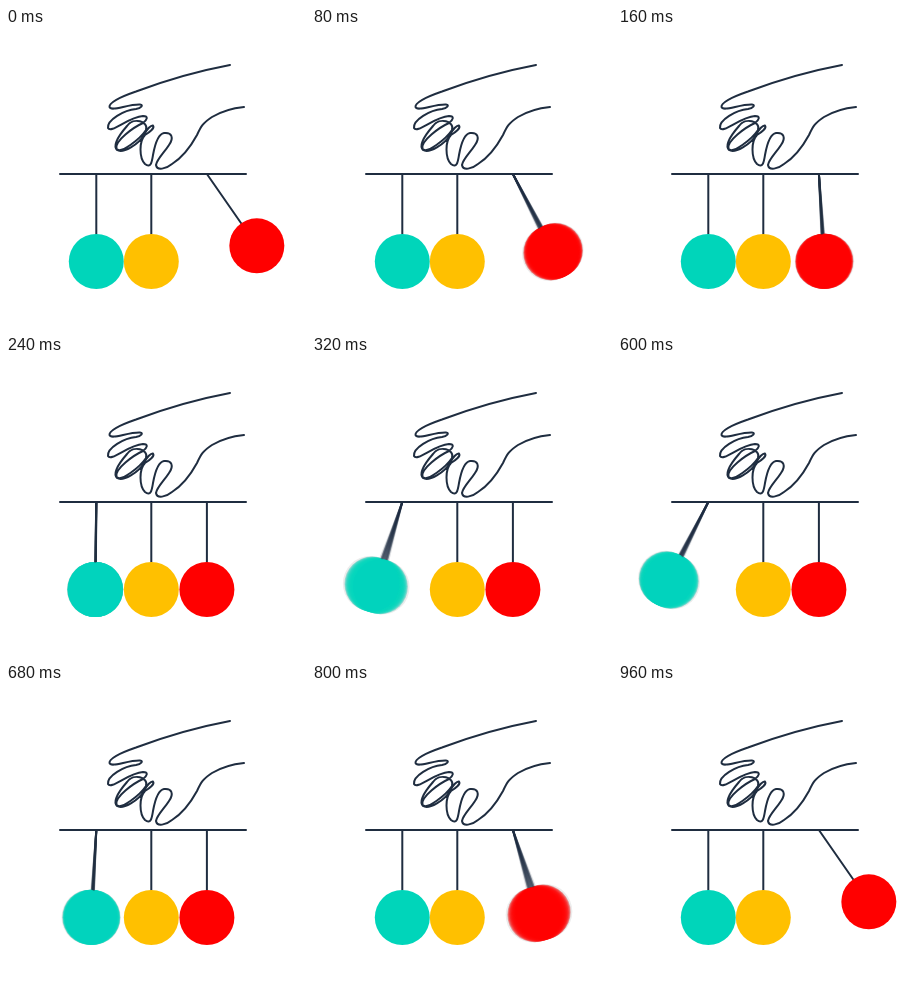
Recreate the animation shown at these times as an HTML page with a canvas. Size 300 by 300 pixels, loop 1000 ms.

```html
<!DOCTYPE html>
<html lang="en">
<head>
<meta charset="utf-8">
<title>Hand and swinging balls</title>
<style>
  html, body { margin: 0; width: 100%; height: 100%; overflow: hidden; background: #fff; }
  canvas { display: block; width: 100vw; height: 100vh; }
</style>
</head>
<body>
<canvas id="stage" width="300" height="300"></canvas>
<script>
const ctx = document.getElementById('stage').getContext('2d');
const INK = '#1f2d40';
const LOOP = 1000, STEP = 40;
const BAR_Y = 146, LENGTH = 87.5, RADIUS = 27.5;
const SWING = 34.8 * Math.PI / 180;

const hand = new Path2D(`M224 37 C192 43 158 53 130 63.5 C117 68 103 74 103.5 79
  C105 84 122 76 134 76.5 C138 77 135 80 130 81
  C118 82 101 92 102 100 C105 106 122 89 137 88
  C143 88 141 92 137 95 C128 99 108 113 110.5 121
  C115 126 134 111 140 102 C143 93 127 89 121 98
  C108 113 108 119 111 122 C117 126 133 116 138 107
  C141 101 145 97 147 97.5 C149 100 144 104 139 107
  C133 113 133 130 139 136 C145 141 146 133 147 127
  C149 116 152 106 158 105 C166 104 168 110 163 117
  C158 125 151 131 150 137 C151 143 160 141 166 136
  C177 129 185 118 191 107 C195 98 197 95 206 89
  C216 83 228 80 238 79`);

function ease(t, start, duration) {
  const x = Math.min(1, Math.max(0, (t - start) / duration));
  return x < 0.5 ? 4 * x ** 3 : 1 - 4 * (1 - x) ** 3;
}

const leftSwing = t => ease(t, 200, 240) - ease(t, 508, 240);
const rightSwing = t => 1 - ease(t, -10, 240) + ease(t, 680, 240) - ease(t, 990, 240);

function pendulum(x, angle, color, alpha = 1) {
  const dx = Math.sin(angle), dy = Math.cos(angle);
  const cx = x + dx * LENGTH, cy = BAR_Y + dy * LENGTH;
  ctx.globalAlpha = alpha;
  ctx.strokeStyle = INK;
  ctx.fillStyle = color;
  ctx.beginPath();
  ctx.moveTo(x, BAR_Y);
  ctx.lineTo(cx - dx * RADIUS, cy - dy * RADIUS);
  ctx.stroke();
  ctx.beginPath();
  ctx.arc(cx, cy, RADIUS, 0, Math.PI * 2);
  ctx.fill();
  ctx.globalAlpha = 1;
}

// A moving ball is smeared over the shutter time, with a grey rim.
function swinging(x, swing, t, color, side) {
  const angle = time => side * SWING * swing(time);
  if (Math.abs(angle(t + 10) - angle(t - 10)) < 0.005) {
    pendulum(x, angle(t), color);
    return;
  }
  for (const lag of [-10, -7, 7, 10]) pendulum(x, angle(t + lag), '#777', 0.14);
  for (let lag = -7; lag <= 7; lag++) pendulum(x, angle(t + lag), color, 0.28);
}

function draw(now) {
  const t = Math.floor(now % LOOP / STEP) * STEP;
  ctx.fillStyle = '#fff';
  ctx.fillRect(0, 0, 300, 300);
  ctx.lineWidth = 2;
  ctx.lineCap = ctx.lineJoin = 'round';
  swinging(90.3, leftSwing, t, '#00d5ba', -1);
  pendulum(145.3, 0, '#ffc000');
  swinging(200.9, rightSwing, t, '#ff0000', 1);
  ctx.strokeStyle = INK;
  ctx.stroke(hand);
  ctx.beginPath();
  ctx.moveTo(54, BAR_Y);
  ctx.lineTo(240, BAR_Y);
  ctx.stroke();
}

const begin = performance.now();
function tick() {
  draw(performance.now() - begin);
  requestAnimationFrame(tick);
}
tick();
</script>
</body>
</html>
```
